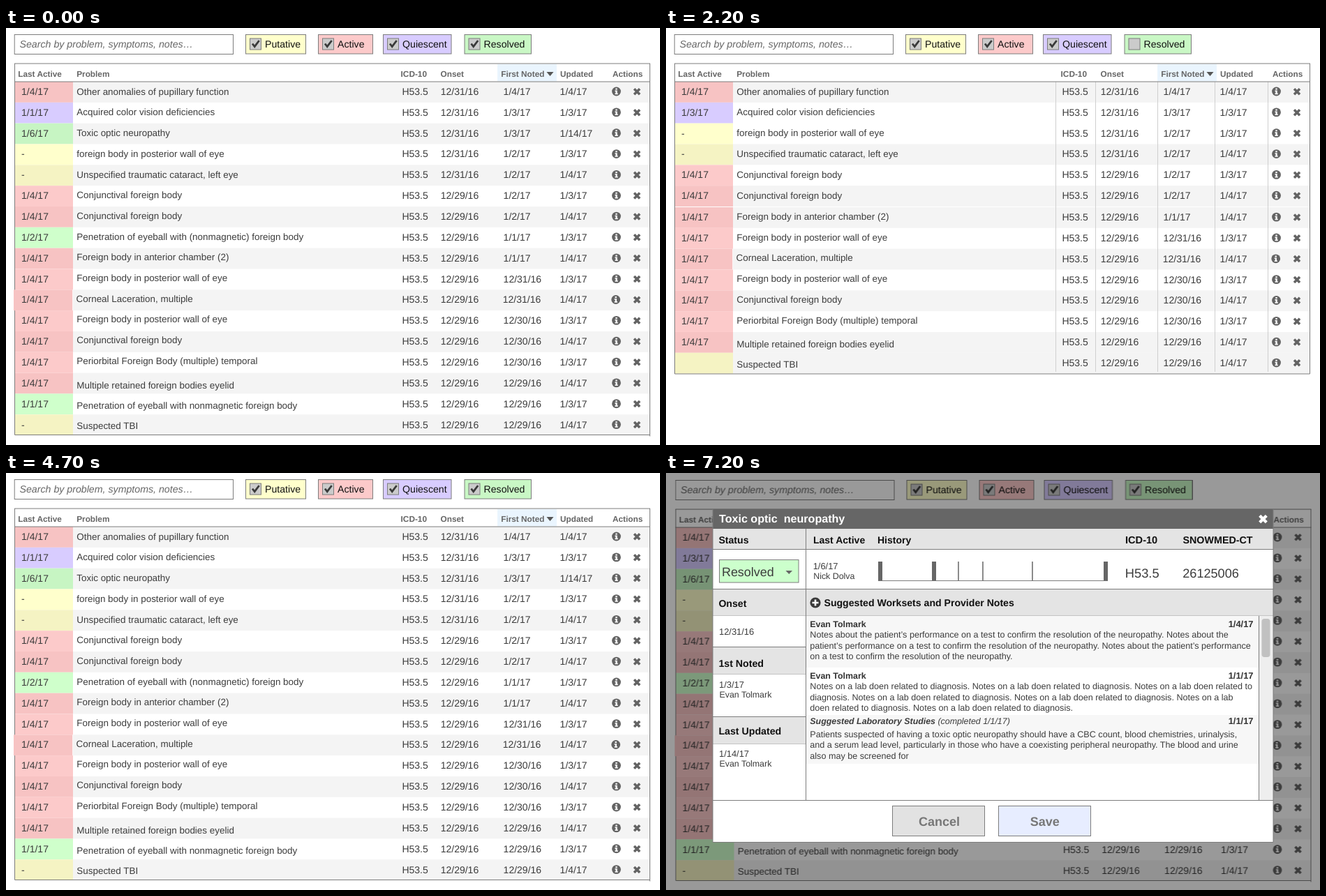
An HTML page for the animation above (8000 ms loop, 937 px wide and 598 px high).

```html
<!DOCTYPE html>
<html lang="en">
<head>
<meta charset="utf-8">
<title>Problem list</title>
<style>
  html, body { margin: 0; width: 100%; height: 100%; overflow: hidden; background: #fff; }
  svg { display: block; width: 937px; height: 598px; font-family: "Liberation Sans", Arial, sans-serif; }
  text { white-space: pre; fill: #3c3c3c; text-rendering: geometricPrecision; }
  .bold { font-weight: bold; }
  .ital { font-style: italic; }
  #page, #full, #filtered, #dialog, #tap, #check, .before, .after { animation: 8s step-end infinite; }
  #page { animation-name: shift; }
  #full, #check { animation-name: full; }
  #filtered { animation-name: filtered; }
  #dialog, .after { animation-name: dialog; }
  .before { animation-name: before; }
  #tap { animation-name: tap; }
  @keyframes shift { 0% { transform: none; } 75%, 100% { transform: translate(1.5px, 1px); } }
  @keyframes full { 0% { opacity: 1; } 12.5% { opacity: 0; } 43.75%, 100% { opacity: 1; } }
  @keyframes filtered { 0% { opacity: 0; } 12.5% { opacity: 1; } 43.75%, 100% { opacity: 0; } }
  @keyframes dialog { 0% { opacity: 0; } 75%, 100% { opacity: 1; } }
  @keyframes before { 0% { opacity: 1; } 75%, 100% { opacity: 0; } }
  @keyframes tap {
    0% { opacity: 0; transform: translate(699px, 25.5px); }
    6.25% { opacity: 1; transform: translate(699px, 25.5px); }
    12.5% { opacity: 0; transform: translate(705px, 15.5px); }
    37.5% { opacity: 1; transform: translate(705px, 15.5px); }
    43.75% { opacity: 0; transform: translate(870px, 153.5px); }
    68.75% { opacity: 1; transform: translate(870px, 153.5px); }
    75%, 100% { opacity: 0; transform: translate(870px, 153.5px); }
  }
</style>
</head>
<body>
<svg id="stage" viewBox="0 0 937 598">
  <defs>
    <g id="info">
      <circle r="6.4" fill="#636363"/>
      <path d="M-1.2-4.4h2.4v2h-2.4zM-2-1.4h3.2v4h1v1.6h-4.2v-1.6h1v-2.4h-1z" fill="#fff"/>
    </g>
    <path id="cross" d="M-4-4L4 4M4-4L-4 4" stroke-width="3.6"/>
    <path id="tick" d="M-4.5-.5L-1.3 3.6L5.2-5" fill="none" stroke="#3a3a3a" stroke-width="2.8"/>
  </defs>
</svg>
<script>
const LINE = '#7d7d7d';
const esc = s => s.replace(/&/g, '&amp;');
const text = (x, y, size, str, attrs = '') =>
  `<text x="${x}" y="${y}" font-size="${size}" ${attrs}>${esc(str)}</text>`;
const bold = (x, y, size, str, fill = '#111', more = '') =>
  text(x, y, size, str, `class="bold" style="fill:${fill}" ${more}`);
const rect = (x, y, w, h, fill, stroke = 'none') =>
  `<rect x="${x}" y="${y}" width="${w}" height="${h}" fill="${fill}" stroke="${stroke}"/>`;
const line = (d, stroke = LINE, width = 1) =>
  `<path d="${d}" fill="none" stroke="${stroke}" stroke-width="${width}"/>`;
const use = (id, x, y, attrs = '') => `<use href="#${id}" x="${x}" y="${y}" ${attrs}/>`;
const group = (id, body) => `<g id="${id}">${body}</g>`;

// status: [colour on white, colour on grey]
const TONE = {
  A: ['#fccaca', '#f7c3c3'], Q: ['#d8ccff', '#d0c5f4'],
  R: ['#cfffcb', '#c7f5c3'], P: ['#ffffcc', '#f5f3c3']
};
const ROWS = [
  ['A', '1/4/17', 'Other anomalies of pupillary function', '1/4/17'],
  ['Q', '1/1/17', 'Acquired color vision deficiencies', '1/3/17'],
  ['R', '1/6/17', 'Toxic optic neuropathy', '1/3/17'],
  ['P', '-', 'foreign body in posterior wall of eye', '1/2/17'],
  ['P', '-', 'Unspecified traumatic cataract, left eye', '1/2/17'],
  ['A', '1/4/17', 'Conjunctival foreign body', '1/2/17'],
  ['A', '1/4/17', 'Conjunctival foreign body', '1/2/17'],
  ['R', '1/2/17', 'Penetration of eyeball with (nonmagnetic) foreign body', '1/1/17'],
  ['A', '1/4/17', 'Foreign body in anterior chamber (2)', '1/1/17'],
  ['A', '1/4/17', 'Foreign body in posterior wall of eye', '12/31/16'],
  ['A', '1/4/17', 'Corneal Laceration, multiple', '12/31/16'],
  ['A', '1/4/17', 'Foreign body in posterior wall of eye', '12/30/16'],
  ['A', '1/4/17', 'Conjunctival foreign body', '12/30/16'],
  ['A', '1/4/17', 'Periorbital Foreign Body (multiple) temporal', '12/30/16'],
  ['A', '1/4/17', 'Multiple retained foreign bodies eyelid', '12/29/16'],
  ['R', '1/1/17', 'Penetration of eyeball with nonmagnetic foreign body', '12/29/16'],
  ['P', '-', 'Suspected TBI', '12/29/16']
].map(([status, active, name, noted], i) => ({ status, active, name, noted, i }));

function statusDate(row, y, filtered) {
  const at = (str, cls = '') => text(22, y, 14, str, `class="${cls}"`);
  if (row.i === 1) return filtered ? at('1/3/17') : at('1/1/17', 'before') + at('1/3/17', 'after');
  return filtered && row.i === 16 ? '' : at(row.active);
}

function drawRow(row, j, count, filtered) {
  const { i, status, name, noted } = row;
  const grey = i % 2 === 0;
  const gap = filtered && j > 5 ? 1 : 0;
  const top = 77 + j * 29.83 + gap;
  const y = 95.9 + j * 29.85 + gap;
  const tail = j - (count - (filtered ? 2 : 3));
  const nameY = tail >= 0
    ? (filtered ? 458.3 : 516.5) + tail * 29
    : 95.7 + j * (filtered ? 29.78 : 29.7) + gap / 2;
  const dx = i === 10 ? -.8 : 0;
  const left = dx && !filtered ? 11 : 13;
  const updated = i === 2 ? '1/14/17' : grey ? '1/4/17' : '1/3/17';
  return (grey ? rect(96, top, 826, 29.83, '#f4f4f4') : '') +
    rect(left, top, 96 + dx - left, 29.83, TONE[status][+grey]) +
    statusDate(row, y, filtered) +
    text(101.3 + dx, nameY, 13.45, name) +
    text(567.4, y, 14, 'H53.5') +
    text(622.7, y, 14, i < 5 ? '12/31/16' : '12/29/16') +
    text(712.6 + dx, y, 14, noted) +
    text(793.6, y, 14, updated) +
    use('info', 874.5 + dx, y - 4.9) +
    use('cross', 904, y - 4.6, 'stroke="#636363"');
}

function drawTable(rows, bottom, filtered) {
  const bars = [558.5, 615.5, 704.5, 786.5, 862.5].map(x => `M${x} 77V493`).join('');
  return line(`M12.5 51V${bottom}`) +
    rows.map((r, j) => drawRow(r, j, rows.length, filtered)).join('') +
    (filtered ? line(bars, '#cfcfcf') : '') +
    line(`M12.5 ${bottom}H922.5M922.5 51V${bottom + (filtered ? 0 : 2)}`);
}

function drawFilter(x, w, label, fill, tickId = '') {
  return rect(x, 9.5, w, 27.5, fill, LINE) +
    rect(x + 6, 15, 16, 16, '#cbcbcb', LINE) +
    `<g id="${tickId}">${use('tick', x + 14, 23)}</g>` +
    text(x + 27.6, 28, 14.1, label, 'style="fill:#111"');
}

function drawPage() {
  const heads = [[17.3, 'Last Active'], [101.2, 'Problem'], [565.6, 'ICD-10'], [622.5, 'Onset'],
    [709.2, 'First Noted'], [794, 'Updated'], [869, 'Actions']];
  const all = drawTable(ROWS, 583.5, false);
  const some = drawTable(ROWS.filter(r => r.status !== 'R'), 496, true);
  return rect(12.2, 9.5, 313.3, 28, '#fff', LINE) +
    text(19.5, 28.2, 14.2, 'Search by problem, symptoms, notes…', 'class="ital" style="fill:#666"') +
    drawFilter(343.5, 86, 'Putative', '#ffffcc') +
    drawFilter(447.5, 78, 'Active', '#fccaca') +
    drawFilter(540.5, 97.5, 'Quiescent', '#d8ccff') +
    drawFilter(657, 95.5, 'Resolved', '#c9f7c5', 'check') +
    rect(704, 52, 85, 24.5, '#eaf5fe') +
    group('full', all) + group('filtered', some) +
    line('M12 51H923M12 77H923') +
    heads.map(([x, s]) => bold(x, 70, 11.8, s, '#666')).join('') +
    '<path d="M774.5 63h10l-5 6z" fill="#555"/>';
}

function drawNotes() {
  const body = (y, lines) =>
    lines.map((s, k) => text(206.3, y + k * 15.6, 12.6, s)).join('');
  const head = (y, date, title) => title +
    bold(841.5, y, 12.9, date, '#333', 'text-anchor="end"');
  const author = y => bold(206.3, y, 12.4, 'Evan Tolmark', '#333');
  const about = 'Notes about the patient’s performance';
  const test = 'on a test to confirm the resolution of the neuropathy.';
  const lab = 'Notes on a lab doen related to diagnosis.';
  return rect(201, 205, 648, 74, '#f7f7f7') + rect(201, 347, 648, 70, '#f7f7f7') +
    head(220.5, '1/4/17', author(220.5)) +
    body(236.2, [`${about} ${test} Notes about the`,
      `patient’s performance ${test} ${about}`, test]) +
    head(294.5, '1/1/17', author(294.5)) +
    body(310.2, [`${lab} ${lab} Notes on a lab doen related to`,
      `diagnosis. ${lab} ${lab} Notes on a lab`, `doen related to diagnosis. ${lab}`]) +
    head(360, '1/1/17', '<text x="206.3" y="360" font-size="12.4" class="ital"><tspan class="bold">' +
      'Suggested Laboratory Studies</tspan> (completed 1/1/17)</text>') +
    body(378.7, [
      'Patients suspected of having a toxic optic neuropathy should have a CBC count, blood chemistries, urinalysis,',
      'and a serum lead level, particularly in those who have a coexisting peripheral neuropathy. The blood and urine',
      'also may be screened for']);
}

function drawDialog() {
  const small = (y, date, name = '', x = 76) =>
    text(x, y, 12.9, date) + text(x + .5, y + 14.3, 12.4, name);
  const button = (x, label, fill, mid) => rect(x, 477.5, 132, 43, fill, LINE) +
    bold(mid, 506.3, 18, label, '#777', 'text-anchor="middle"');
  const bar = (x, w) => rect(x, 127, w, 27.5, '#666');
  return rect(0, 0, 937, 598, 'rgba(0,0,0,.4)') +
    rect(67, 52, 803, 477.5, '#fff') +
    rect(67, 52, 803, 28, '#666') +
    bold(76, 71.3, 16.1, 'Toxic optic  neuropathy', '#fff') +
    use('cross', 0, 0, 'stroke="#fff" transform="translate(855.5 66) scale(1.2)"') +
    rect(67, 80, 803, 29.5, '#e4e4e4') + rect(67, 167, 803, 37.5, '#e4e4e4') +
    rect(67, 250, 133, 38, '#e4e4e4') + rect(67, 350, 133, 38, '#e4e4e4') +
    bold(75.4, 101.4, 14.1, 'Status') + bold(211, 101.4, 14, 'Last Active') +
    bold(303, 101.4, 14, 'History') + bold(658, 101, 14.6, 'ICD-10') +
    bold(740.5, 101, 14.3, 'SNOWMED-CT') + bold(75.4, 191.8, 14.1, 'Onset') +
    bold(75.4, 278, 14.2, '1st Noted') + bold(75.4, 375.3, 14.2, 'Last Updated') +
    rect(76.5, 124.5, 113.5, 32.5, '#ccffcc', LINE) +
    text(80, 148.2, 17.9, 'Resolved') +
    '<path d="M171.5 140h9.5l-4.75 5z" fill="#666"/>' +
    small(137.8, '1/6/17', 'Nick Dolva', 210.7) + small(232.3, '12/31/16') +
    small(307.7, '1/3/17', 'Evan Tolmark') + small(406.7, '1/14/17', 'Evan Tolmark') +
    line('M304 154.5H633') + bar(304, 6) + bar(381, 6) + bar(627, 6) +
    [418.2, 453.2, 524.2].map(x => bar(x, 1.5)).join('') +
    text(657.8, 150.3, 18.3, 'H53.5') + text(740.3, 150.3, 18.1, '26125006') +
    '<circle cx="214" cy="186" r="7.6" fill="#3a3a3a"/>' +
    line('M209.5 186h9M214 181.5v9', '#fff', 2.6) +
    bold(226.5, 191, 14.1, 'Suggested Worksets and Provider Notes') +
    drawNotes() +
    rect(849.5, 205, 20, 264, '#eee') +
    '<rect x="853.5" y="209" width="12" height="55" rx="4" fill="#c1c1c1"/>' +
    line('M67 204.5H870M67 288.5H200M67 388.5H200', '#c4c4c4') +
    line('M67 109.5H870M67 166.5H870M67 249.5H200M67 349.5H200M67 469.5H870M200.5 80V469M849.5 205V469') +
    button(324.5, 'Cancel', '#e2e2e2', 391.5) + button(476.5, 'Save', '#e7edff', 542.8) +
    line('M67 52V529.5H870V52');
}

document.getElementById('stage').insertAdjacentHTML('beforeend',
  group('page', drawPage()) +
  '<circle id="tap" r="16" fill="rgba(0,0,0,.29)"/>' +
  group('dialog', drawDialog()));
</script>
</body>
</html>
```
